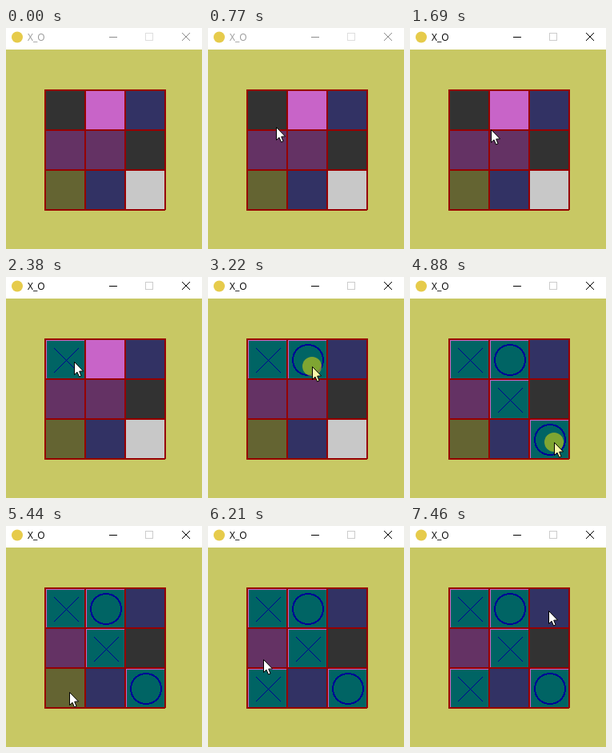
An HTML page with a canvas for the animation above (8000 ms loop, 245x277 px).

```html
<!DOCTYPE html>
<html lang="en">
<head>
<meta charset="utf-8">
<title>X_O</title>
<style>
  html, body { margin: 0; width: 100%; height: 100%; overflow: hidden; background: #c8c864; }
  canvas { display: block; width: 245px; height: 277px; }
</style>
</head>
<body>
<canvas id="stage" width="245" height="277"></canvas>
<script>
const ctx = document.getElementById('stage').getContext('2d');
const LOOP = 8000, ENTER_AT = 110, FOCUS_AT = 950;
const LEFT = 50, TOP = 79, PITCH = 50, SIZE = 48;

const DARK = '#323232', NAVY = '#323264', PLUM = '#643264', PINK = '#c864c8';
const LINE = '#960000', TEAL = '#006464', BLUE = '#000096';
const cells = [DARK, PINK, NAVY, PLUM, PLUM, DARK, '#646432', NAVY, '#c8c8c8'];

// Pointer moves: start, end, x, y
const entry = { x: 184, y: 278 };
const moves = [
  [70, 760, 85, 124], [990, 1310, 104, 130], [1670, 1970, 78, 105],
  [2340, 2790, 130, 112], [3410, 3910, 130, 159], [4350, 4780, 180, 207],
  [5020, 5570, 72, 208], [6040, 6390, 67, 149], [6640, 6870, 71, 148],
  [7090, 7460, 173, 106]
];

// Press, release; the first click only focuses the window
const clicks = [
  [830, FOCUS_AT], [2010, 2150], [3220, 3400], [4190, 4330], [4830, 4960], [5760, 5900]
];

function pointerAt(t) {
  let { x, y } = entry;
  for (const [start, end, toX, toY] of moves) {
    const p = Math.min(1, Math.max(0, (t - start) / (end - start)));
    const e = Math.sin(p * Math.PI / 2);
    x += (toX - x) * e;
    y += (toY - y) * e;
  }
  return { x: Math.round(x), y: Math.round(y) };
}

function cellAt({ x, y }) {
  return Math.floor((x - LEFT) / PITCH) + 3 * Math.floor((y - TOP) / PITCH);
}

// X and O take turns
const turns = clicks.slice(1).map(([at], i) => ({
  at, cell: cellAt(pointerAt(at)), mark: i % 2 ? 'O' : 'X'
}));

function rect(color, x, y, w, h) {
  ctx.fillStyle = color;
  ctx.fillRect(x, y, w, h);
}

function disc(color, x, y, r) {
  ctx.fillStyle = color;
  ctx.beginPath();
  ctx.arc(x, y, r, 0, Math.PI * 2);
  ctx.fill();
}

function drawTitleBar(active) {
  const ink = active ? '#000' : '#8c8c8c';
  rect('#fff', 0, 0, 245, 27);
  disc('#e6cb4b', 14, 11.5, 7);
  ctx.fillStyle = active ? '#000' : '#999';
  ctx.font = '12px "Open Sans", "Noto Sans", sans-serif';
  ctx.fillText('X_O', 27, 16);
  rect(ink, 129, 11, 10, 1);
  ctx.lineWidth = 1;
  ctx.strokeStyle = active ? '#ccc' : '#dedede';
  ctx.strokeRect(174.5, 6.5, 9, 9);
  ctx.strokeStyle = ink;
  ctx.beginPath();
  ctx.moveTo(220, 6);
  ctx.lineTo(230, 16);
  ctx.moveTo(230, 6);
  ctx.lineTo(220, 16);
  ctx.stroke();
}

function corner(cell) {
  return [LEFT + cell % 3 * PITCH, TOP + Math.floor(cell / 3) * PITCH];
}

// Marks are plotted pixel by pixel, without smoothing
function drawMark({ cell, mark }) {
  const [x, y] = corner(cell);
  rect(PINK, x, y, SIZE, SIZE);
  rect(TEAL, x + 1, y + 1, SIZE - 1, SIZE - 1);
  for (let i = 0; i < PITCH; i++) {
    for (let j = 0; j < PITCH; j++) {
      const r = Math.hypot(i - 24.5, j - 24.5);
      const cross = i >= 10 && i <= 40 && (i === j || i + j === 50);
      const ring = r > 18 && r <= 20;
      if (mark === 'X' ? cross : ring) rect(BLUE, x + i, y + j, 1, 1);
    }
  }
}

function drawBoard(t) {
  cells.forEach((color, i) => rect(color, ...corner(i), SIZE, SIZE));
  turns.filter(turn => t >= turn.at).forEach(drawMark);
  for (let i = 0; i < 4; i++) {
    rect(LINE, LEFT - 2 + i * PITCH, TOP - 2, 2, 151);
    rect(LINE, LEFT - 2, TOP - 2 + i * PITCH, 151, 2);
  }
}

function drawPointer({ x, y }, fill) {
  const shape = [[0, 0], [0, 16], [3.5, 12.7], [6, 18.5], [8.6, 17.5], [6.2, 11.7], [11, 11.4]];
  ctx.beginPath();
  for (const [dx, dy] of shape) ctx.lineTo(x + dx + 0.5, y + dy + 0.5);
  ctx.closePath();
  ctx.fillStyle = fill;
  ctx.fill();
  ctx.strokeStyle = '#000';
  ctx.lineWidth = 1;
  ctx.stroke();
}

function draw(t) {
  rect('#c8c864', 0, 0, 245, 277);
  drawTitleBar(t >= FOCUS_AT);
  drawBoard(t);
  const tip = pointerAt(t);
  const pressed = clicks.some(([down, up]) => t >= down && t < up);
  if (pressed) disc('rgba(205,205,20,.62)', tip.x, tip.y, 12);
  if (t >= ENTER_AT) drawPointer(tip, pressed ? '#fafaaa' : '#fff');
}

const start = performance.now();
function tick() {
  draw((performance.now() - start) % LOOP);
  requestAnimationFrame(tick);
}
tick();
</script>
</body>
</html>
```
